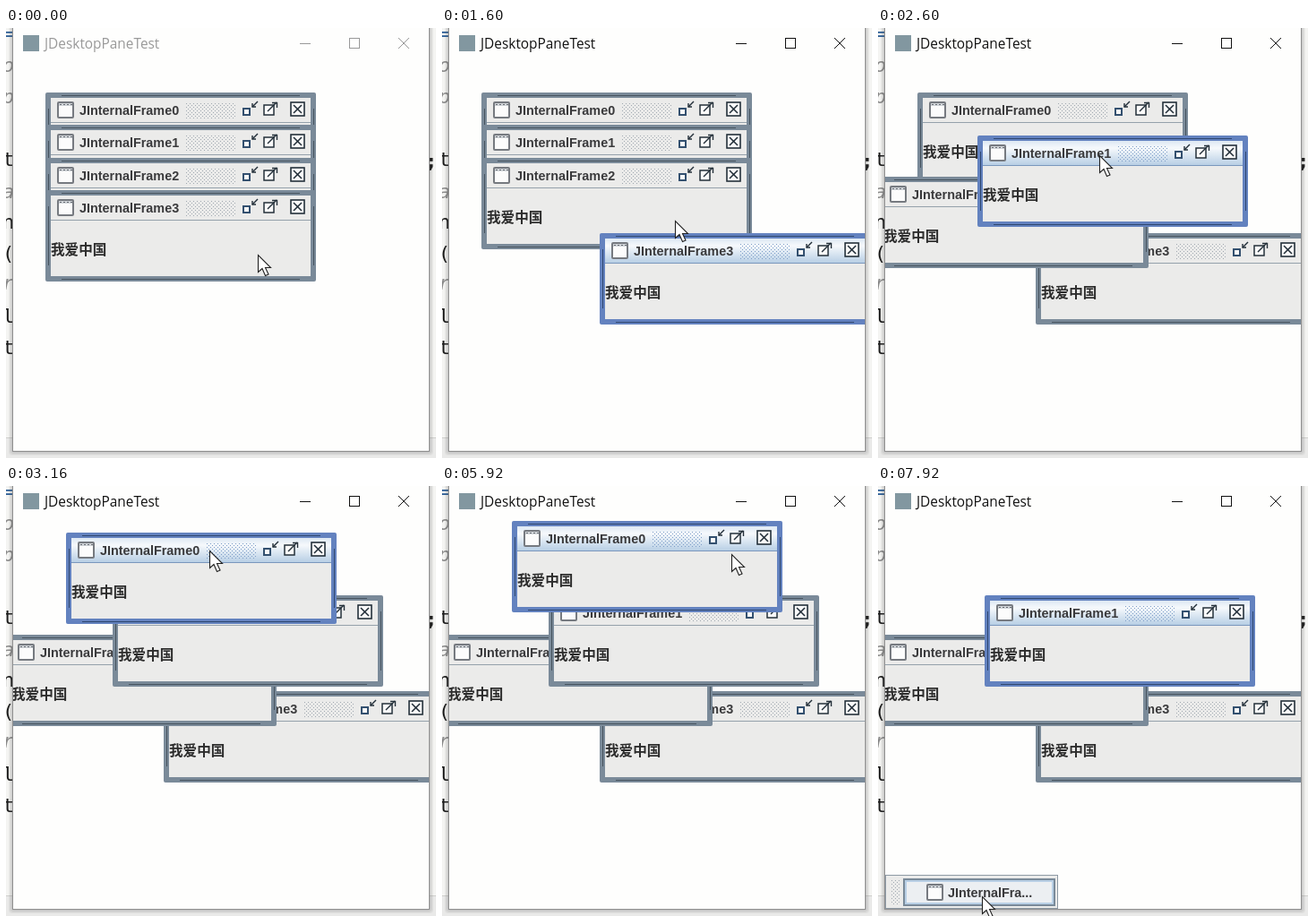
An HTML page with a canvas for the animation above (8000 ms loop, 480 by 480 pixels).

```html
<!DOCTYPE html>
<html lang="en">
<head>
<meta charset="utf-8">
<title>JDesktopPaneTest</title>
<style>
  html, body { margin: 0; width: 100%; height: 100%; overflow: hidden; }
  canvas { display: block; width: 480px; height: 480px; }
</style>
</head>
<body>
<canvas id="stage" width="480" height="480"></canvas>
<script>
const g = document.getElementById('stage').getContext('2d');
const LOOP = 8000;
const W = 302, H = 102;
const BOLD = 'bold 14.4px "Liberation Sans", Arial, sans-serif';
const HAN = 'bold 15.6px "Noto Sans CJK SC", "Noto Sans CJK", sans-serif';
const BODY = '#ebebea', PANE = '#fefefd', INK = '#24303a', LIGHT = '#fafafa';

// border, edge line, title underline and bumps of a frame
const IDLE = { rim: '#7a8a99', edge: '#46535e', rule: '#95a1ab', bump: '#a0a8b0' };
const LIVE = { rim: '#6382bf', edge: '#2f476f', rule: '#7a97bd', bump: '#7c9cc6' };

// pointer: time, x, y
const PATH = [
  [0, 281, 253], [40, 281, 253], [800, 154, 192], [1000, 154, 192],
  [1120, 176, 213], [1520, 286, 240], [1760, 209, 165], [1960, 165, 186],
  [2080, 165, 186], [2280, 180, 130], [2640, 255, 144], [2960, 204, 92],
  [3160, 227, 72], [3360, 238, 59], [3960, 323, 61], [4160, 323, 61],
  [4520, 414, 58], [4700, 414, 58], [5880, 323, 76], [5960, 323, 76],
  [6040, 314, 73], [6160, 299, 69], [6440, 299, 69], [6600, 304, 60],
  [6720, 304, 60], [7840, 116, 458]
];

// each frame follows the pointer between grab and drop
const FRAMES = [
  { id: 0, y: 72, pick: 2960, grab: 2960, drop: 3360 },
  { id: 1, y: 108, pick: 2280, grab: 2280, drop: 2640 },
  { id: 2, y: 145, pick: 1760, grab: 1760, drop: 1960 },
  { id: 3, y: 181, pick: 760, grab: 1000, drop: 1520 }
];
const ACTIVATE = 760, MAXIMIZE = 4000, RESTORE = 4720, ICONIFY = 6680;
const POPUPS = [[2000, 2280, 131, 208], [4200, RESTORE, 290, 84]];

function pointer(t) {
  const n = PATH.findIndex(p => p[0] > t);
  if (n < 0) return PATH[PATH.length - 1].slice(1);
  const [t0, x0, y0] = PATH[n - 1], [t1, x1, y1] = PATH[n];
  const k = (t - t0) / (t1 - t0);
  return [Math.round(x0 + (x1 - x0) * k), Math.round(y0 + (y1 - y0) * k)];
}

function place(f, t) {
  const a = pointer(f.grab), b = pointer(Math.min(Math.max(t, f.grab), f.drop));
  return [44 + b[0] - a[0], f.y + b[1] - a[1]];
}

function box(x, y, w, h, fill) {
  g.fillStyle = fill;
  g.fillRect(x, y, w, h);
}

function round(x, y, w, h, r, fill) {
  g.beginPath();
  g.roundRect(x, y, w, h, r);
  g.fillStyle = fill;
  g.fill();
}

function ring(x, y, w, h, color, lw = 1) {
  g.strokeStyle = color;
  g.lineWidth = lw;
  g.strokeRect(x, y, w, h);
}

function line(pts, color, lw = 1) {
  g.beginPath();
  pts.forEach(([x, y], i) => i ? g.lineTo(x, y) : g.moveTo(x, y));
  g.strokeStyle = color;
  g.lineWidth = lw;
  g.stroke();
}

function text(s, x, y, font, color) {
  g.font = font;
  g.fillStyle = color;
  g.fillText(s, x, y);
}

function bumps(x, y, w, h, color) {
  g.fillStyle = color;
  for (let r = 0; r < h; r += 2)
    for (let c = r % 4; c < w; c += 4) g.fillRect(x + c, y + r, 1, 1);
}

function backdrop() {
  box(0, 0, 480, 480, '#f4f4f2');
  box(0, 457, 480, 23, '#e9e9e8');
  box(0, 457, 480, 1, '#cfcfcd');
  const code = [['=', 14, 1], ['o', 49, 2], ['p', 84, 2], ['t', 154, 0], ['a', 190, 2],
    ['n', 224, 0], ['(', 259, 0], ['r', 292, 2], ['l', 329, 0], ['t', 364, 0]];
  const tint = ['#1c1c1c', '#2c5d96', '#8c8c8c'];
  for (const [s, y, k] of code)
    text(s, -4, y, (k > 1 ? 'italic ' : '') + '22px "DejaVu Sans Mono", monospace', tint[k]);
  text(';', 468, 156, 'bold 22px "DejaVu Sans Mono", monospace', tint[0]);
  for (let i = 5; i > 0; i--)
    round(8 - i, -8, 464 + 2 * i, 480 + i, 4, 'rgba(70,70,70,.06)');
}

function mainWindow(active) {
  backdrop();
  box(7, 0, 466, 473, '#8f8f8f');
  box(8, 0, 464, 472, PANE);
  box(19, 8, 18, 18, '#8297a0');
  const c = active ? '#111' : '#999';
  text('JDesktopPaneTest', 43, 23, '15.4px "Open Sans", sans-serif', c);
  line([[328, 17.5], [340, 17.5]], c);
  ring(383.5, 11.5, 11, 11, c);
  line([[438, 11], [450, 23]], c);
  line([[450, 11], [438, 23]], c);
}

function smallIcon(x, y) {
  round(x, y, 19, 19, 2, '#767a80');
  box(x + 2, y + 2, 15, 15, '#fcfcfc');
  box(x + 2, y + 2, 15, 3, '#d0d4d8');
  for (let i = 0; i < 4; i++) box(x + 3 + i * 4, y + 3, 2, 1, '#666b72');
}

function shrinkIcon(x, y, s) {
  box(x, y, s, s, LIGHT);
  ring(x, y, s, s, '#33506f', 2);
  const tipX = x + s + 3, tipY = y - 2;
  line([[tipX + 6, tipY - 6], [tipX, tipY]], INK, 1.4);
  line([[tipX, tipY - 4], [tipX, tipY], [tipX + 4, tipY]], INK, 1.4);
}

function growIcon(x, y) {
  box(x, y, 11, 11, LIGHT);
  ring(x, y, 11, 11, INK, 1.5);
  line([[x + 4, y + 7], [x + 14, y - 3]], INK, 1.4);
  line([[x + 9, y - 2.5], [x + 14.5, y - 2.5], [x + 14.5, y + 3]], INK, 1.4);
}

function closeIcon(x, y) {
  box(x, y, 15, 15, LIGHT);
  ring(x, y, 15, 15, INK, 1.6);
  line([[x + 3, y + 3], [x + 12, y + 12]], INK, 1.6);
  line([[x + 12, y + 3], [x + 3, y + 12]], INK, 1.6);
}

function innerFrame(id, x, y, w, h, active, big) {
  const r = x + w, b = y + h, skin = active ? LIVE : IDLE;
  round(x, y, w, h, 2, skin.rim);
  if (!big) {
    line([[x + 18, y + 3.5], [r - 18, y + 3.5]], skin.edge);
    line([[x + 18, b - 2.5], [r - 18, b - 2.5]], skin.edge);
    line([[x + 3.5, y + 18], [x + 3.5, b - 18]], skin.edge);
    line([[r - 2.5, y + 18], [r - 2.5, b - 18]], skin.edge);
  }
  box(x + 6, y + 6, w - 12, h - 12, BODY);
  if (active) {
    const fade = g.createLinearGradient(0, y + 6, 0, y + 33);
    fade.addColorStop(0, '#dde8f3');
    fade.addColorStop(0.3, '#f6f9fc');
    fade.addColorStop(1, '#b8cfe5');
    box(x + 6, y + 6, w - 12, 27, fade);
  }
  box(x + 6, y + 33, w - 12, 1, skin.rule);
  smallIcon(x + 13, y + 10);
  text('JInternalFrame' + id, x + 38, y + 25, BOLD, '#3a3a3c');
  bumps(x + 157, y + 12, w - 246, 17, skin.bump);
  shrinkIcon(r - 81, y + 18, 7);
  if (big) shrinkIcon(r - 59, y + 17, 9);
  else growIcon(r - 58, y + 14);
  closeIcon(r - 28, y + 11);
  text('我爱中国', x + 6, y + (big ? 239 : 72), HAN, '#2c2c2c');
}

function dockIcon() {
  box(8, 434, 193, 38, '#8d99a4');
  box(9, 435, 191, 36, BODY);
  bumps(15, 440, 10, 28, IDLE.bump);
  box(28, 438, 170, 31, '#7a8a99');
  box(30, 440, 166, 27, '#b8cfe5');
  box(32, 442, 162, 23, '#eceff2');
  smallIcon(54, 444);
  text('JInternalFra...', 78, 459, BOLD, '#3a3a3c');
}

function popup(x, y) {
  const cream = '#fff0ec';
  round(x, y, 74, 37, 9, '#fb5a45');
  g.strokeStyle = cream;
  g.lineWidth = 1.8;
  g.beginPath();
  g.arc(x + 18, y + 18, 11, 2.5, 8.2);
  g.lineTo(x + 8, y + 29);
  g.closePath();
  g.stroke();
  text('AI', x + 11.5, y + 22.5, 'bold 12px "Liberation Sans", Arial, sans-serif', cream);
  line([[x + 37, y + 10], [x + 37, y + 27]], '#ff9c8c');
  g.beginPath();
  g.arc(x + 54, y + 17, 9.5, 0, 7);
  g.strokeStyle = cream;
  g.lineWidth = 1.8;
  g.stroke();
  line([[x + 61, y + 24], [x + 66, y + 29]], cream, 1.8);
}

function arrow([x, y]) {
  g.beginPath();
  [[0, 0], [0, 19], [4.5, 15], [8, 23], [11.5, 21.5], [8, 14], [14, 14]]
    .forEach(([dx, dy]) => g.lineTo(x + 0.5 + dx, y + 0.5 + dy));
  g.closePath();
  g.fillStyle = '#fff';
  g.fill();
  g.strokeStyle = '#222';
  g.lineWidth = 1.1;
  g.stroke();
}

function draw(t) {
  mainWindow(t >= ACTIVATE);
  const rank = f => t >= f.pick ? f.pick : f.id - 10;
  const open = FRAMES.filter(f => f.id || t < ICONIFY).sort((a, b) => rank(a) - rank(b));
  const top = t >= ACTIVATE && open[open.length - 1];

  g.save();
  g.beginPath();
  g.rect(8, 36, 464, 436);
  g.clip();
  for (const f of open) {
    if (!f.id && t >= MAXIMIZE && t < RESTORE) innerFrame(0, 8, 36, 464, 436, true, true);
    else innerFrame(f.id, ...place(f, t), W, H, f === top, false);
  }
  if (t >= ICONIFY) dockIcon();
  g.restore();

  for (const [from, to, x, y] of POPUPS) if (t >= from && t < to) popup(x, y);
  arrow(pointer(t));
}

function tick() {
  // the picture advances in 40 ms steps
  draw(Math.floor(performance.now() % LOOP / 40) * 40);
  requestAnimationFrame(tick);
}
tick();
</script>
</body>
</html>
```
